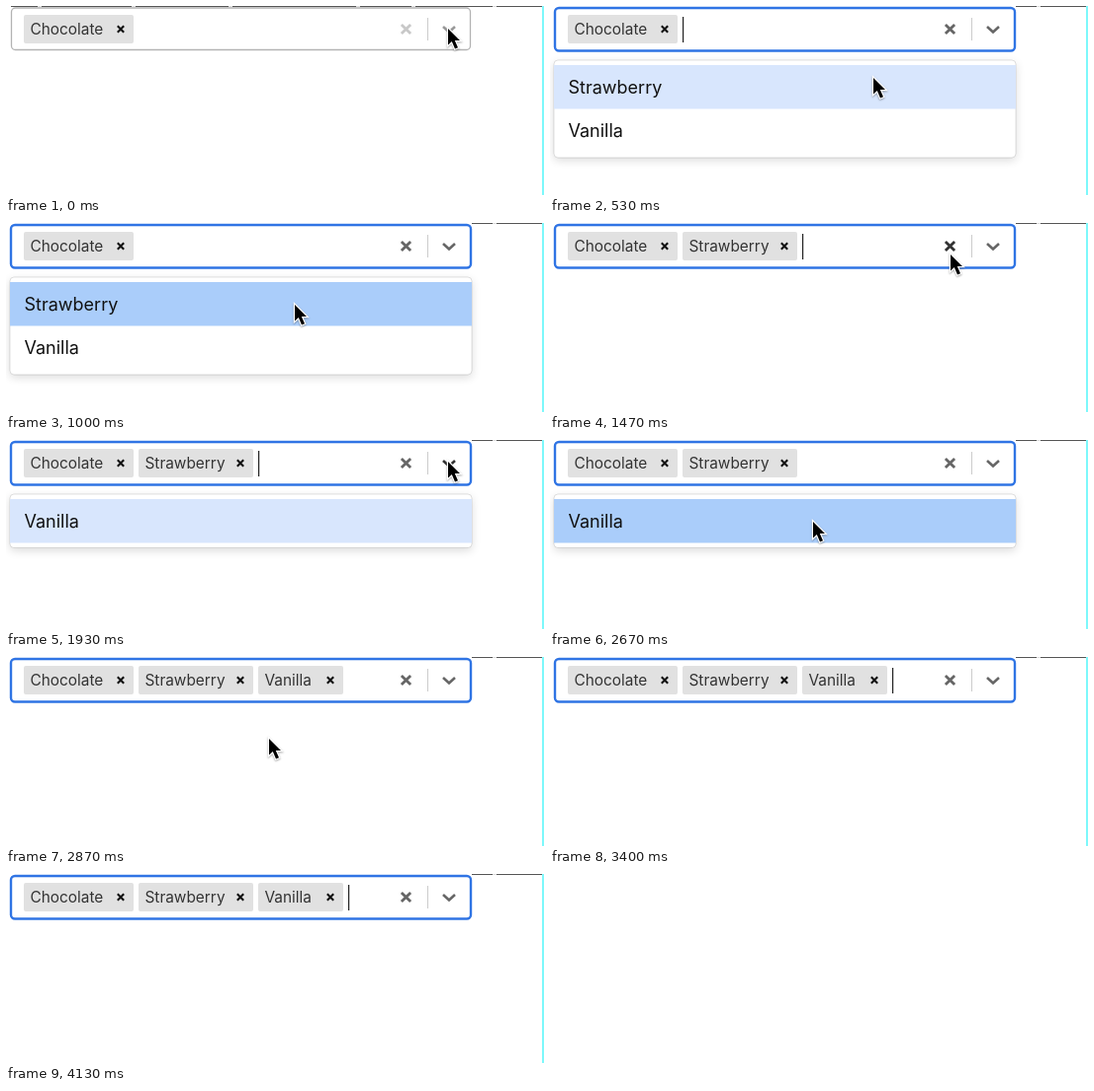
An HTML page with a canvas for the animation above (4340 ms loop, 544 by 192 pixels).

```html
<!DOCTYPE html>
<html lang="en">
<head>
<meta charset="utf-8">
<title>Multi select</title>
<style>
  html, body { margin: 0; width: 544px; height: 192px; overflow: hidden; background: #fff; }
  canvas { display: block; }
</style>
</head>
<body>
<canvas id="stage" width="544" height="192"></canvas>
<script>
const ctx = document.getElementById('stage').getContext('2d');
const LOOP = 4340, TICK = 1000 / 15;
const FONT = 'Inter, "Open Sans", sans-serif';

const chips = [
  { label: 'Chocolate', x: 18, w: 111, from: 0 },
  { label: 'Strawberry', x: 134, w: 116, from: 16 },
  { label: 'Vanilla', x: 255, w: 86, from: 42 }
];

// Spans are [first tick, end tick)
const caretSpans = [[1, 9], [19, 26], [27, 34], [48, 55], [62, 66]];
const menuSpans = [[1, 16], [27, 42]];
const pressSpans = [[14, 16], [40, 42]];

// Pointer path: tick, x, y
const path = [
  [0, 447, 23], [2, 447, 23], [3, 445, 24], [4, 432, 29], [5, 413, 37],
  [6, 385, 48], [8, 327, 73], [9, 303, 81], [10, 292, 83], [18, 292, 83],
  [19, 300, 79], [20, 330, 64], [21, 371, 45], [22, 405, 32], [23, 425, 26],
  [24, 438, 23], [26, 447, 22], [29, 447, 22], [30, 436, 26], [31, 410, 33],
  [32, 369, 45], [33, 325, 60], [34, 290, 73], [35, 270, 81], [36, 266, 83],
  [46, 266, 83], [47, 278, 88], [48, 320, 104], [49, 390, 122], [50, 470, 140]
];

const within = (spans, k) => spans.some(([a, b]) => k >= a && k < b);

function pointerAt(k) {
  const i = path.findIndex(p => p[0] >= k);
  if (i < 0) return null;
  const b = path[i], a = path[i - 1] || b;
  const u = b === a ? 0 : (k - a[0]) / (b[0] - a[0]);
  return { x: a[1] + (b[1] - a[1]) * u, y: a[2] + (b[2] - a[2]) * u };
}

function rect(x, y, w, h, color) {
  ctx.fillStyle = color;
  ctx.fillRect(x, y, w, h);
}

function rounded(x, y, w, h, r) {
  ctx.beginPath();
  ctx.roundRect(x, y, w, h, r);
}

function text(label, x, y, size, color) {
  ctx.font = `${size}px ${FONT}`;
  ctx.fillStyle = color;
  ctx.fillText(label, x, y);
}

function stroke(points, color, width) {
  ctx.beginPath();
  points.forEach(([x, y], i) => i % 2 || points.length === 3 && i ? ctx.lineTo(x, y) : ctx.moveTo(x, y));
  ctx.strokeStyle = color;
  ctx.lineWidth = width;
  ctx.stroke();
}

function cross(x, y, r, color, width) {
  stroke([[x - r, y - r], [x + r, y + r], [x + r, y - r], [x - r, y + r]], color, width);
}

function drawControl(k, focused, pointer) {
  rounded(focused ? 5 : 5.5, 2, focused ? 465 : 464, focused ? 43.5 : 42.5, 4);
  ctx.fillStyle = '#fff';
  ctx.fill();
  ctx.strokeStyle = focused ? '#2f74e4' : '#b3b3b3';
  ctx.lineWidth = focused ? 2.4 : 1.3;
  ctx.stroke();

  const shown = chips.filter(c => k >= c.from);
  for (const c of shown) {
    rounded(c.x, 9, c.w, 29, 2);
    ctx.fillStyle = '#e1e1e1';
    ctx.fill();
    text(c.label, c.x + 6.5, 29, 15.4, '#333');
    cross(c.x + c.w - 13, 23.5, 3.2, '#111', 2.1);
  }
  if (within(caretSpans, k)) {
    const last = shown[shown.length - 1];
    rect(last.x + last.w + 5, 11, 1.2, 26, '#222');
  }

  const over = (x, r) => pointer && pointer.y < 40 && Math.abs(pointer.x - x) < r;
  const idle = focused ? '#666' : '#c8c8c8';
  cross(404.5, 23.5, 4.6, focused && over(404, 17) ? '#333' : idle, 2.8);
  rect(426, 12, 1, 23, '#ccc');
  const arrow = over(448, 18) ? (focused ? '#333' : '#999') : idle;
  stroke([[442, 21], [448, 26.5], [454, 21]], arrow, 2.6);
}

function drawMenu(k) {
  const options = chips.filter(c => k < c.from);
  const h = 10 + 44.5 * options.length;
  ctx.save();
  ctx.shadowColor = 'rgba(0,0,0,.14)';
  ctx.shadowBlur = 10;
  ctx.shadowOffsetY = 3;
  rounded(4, 55, 467, h, 4);
  ctx.fillStyle = '#fff';
  ctx.fill();
  ctx.restore();
  ctx.strokeStyle = 'rgba(0,0,0,.12)';
  ctx.lineWidth = 1;
  ctx.stroke();
  rect(4, 60, 467, 44.5, within(pressSpans, k) ? '#aacdfa' : '#d8e6fd');
  options.forEach((c, i) => text(c.label, 18.5, 88.5 + 44.5 * i, 18, '#111'));
}

function drawPointer({ x, y }) {
  ctx.save();
  ctx.translate(x, y);
  ctx.beginPath();
  for (const p of [[0, 0], [0, 16.5], [3.8, 13], [7, 20.5], [10, 19.2], [6.8, 12], [12, 12]]) ctx.lineTo(...p);
  ctx.closePath();
  ctx.strokeStyle = '#fff';
  ctx.lineWidth = 2.4;
  ctx.shadowColor = 'rgba(0,0,0,.35)';
  ctx.shadowBlur = 2;
  ctx.shadowOffsetY = 1;
  ctx.stroke();
  ctx.shadowColor = 'transparent';
  ctx.fillStyle = '#000';
  ctx.fill();
  ctx.restore();
}

function draw(k) {
  const focused = k > 0, pointer = pointerAt(k);
  rect(0, 0, 544, 192, '#fff');
  rect(focused ? 471 : 5, 0, 539, 1, '#555');
  for (const x of [32, 127, 225, 354, 410, 492]) rect(x, 0, 4, 1, '#ddd');
  if (focused) rect(0, 0, 471, 1, '#fff');
  rect(542, 0, 2, 192, '#7df8fb');
  drawControl(k, focused, pointer);
  if (within(menuSpans, k)) drawMenu(k);
  if (pointer) drawPointer(pointer);
}

ctx.lineCap = 'butt';
function loop() {
  draw(Math.floor((performance.now() % LOOP + 4) / TICK));
  requestAnimationFrame(loop);
}
loop();
</script>
</body>
</html>
```
